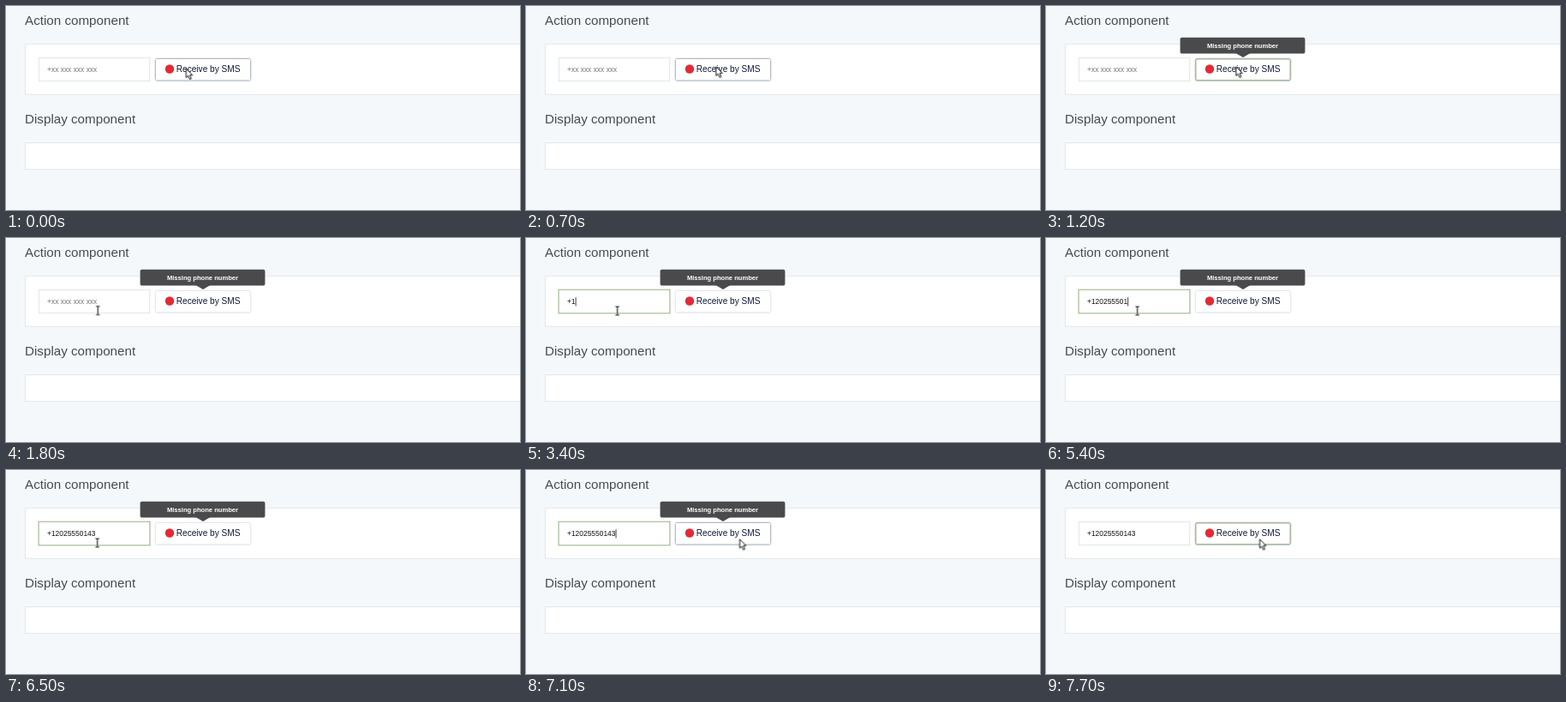
An HTML page for the animation above (8000 ms loop, 600 by 238 pixels).

```html
<!DOCTYPE html>
<html lang="en">
<head>
<meta charset="utf-8">
<title>SMS form</title>
<style>
  html, body { margin: 0; width: 100%; height: 100%; overflow: hidden; background: #f4f8fb; }
  svg { display: block; width: 600px; height: 238px; font-family: "Liberation Sans", Arial, sans-serif; }

  .heading { font-size: 15.2px; fill: #474b50; }
  .field { font-size: 8.44px; }
  .label { font-size: 10.13px; fill: #0c1935; }
  .tip-text { font-size: 7.6px; font-weight: bold; fill: #fff; text-anchor: middle; }
  .panel { fill: #fff; stroke: #e1e5e8; stroke-width: .8; filter: drop-shadow(0 .6px .6px rgba(0,0,0,.08)); }
  .input { fill: #fff; stroke: #dfe1e3; stroke-width: .8; filter: drop-shadow(0 .5px .5px rgba(0,0,0,.08)); }
  .button { fill: #fff; filter: drop-shadow(0 .7px 1px rgba(30,45,70,.34)); }
  .hover { fill: #fff; filter: drop-shadow(0 .9px 1.2px rgba(25,42,75,.7)); }
  .ring { fill: none; stroke: #9fb78b; stroke-width: 1; }

  .anim { animation: 8s step-end infinite; }
  .hover { animation-name: hover; }
  .button-ring { animation-name: button-ring; }
  .input-ring { animation-name: input-ring; }
  .tip { animation-name: tip; }
  .hint { animation-name: hint; }
  .pen { animation-name: type; }
  .caret { animation-name: caret; }
  .pointer { animation-name: move; }
  .arrow { animation-name: arrow; }
  .beam { animation-name: beam; }

  @keyframes hover { 0%, 87.5% { opacity: 1 } 20% { opacity: 0 } 100% { opacity: 1 } }
  @keyframes button-ring { 0%, 22.5% { opacity: 0 } 13.75%, 95%, 100% { opacity: 1 } }
  @keyframes input-ring { 0%, 95%, 100% { opacity: 0 } 23.75% { opacity: 1 } }
  @keyframes tip { 0%, 96.25%, 100% { opacity: 0 } 13.75%, 95% { opacity: .5 } 15% { opacity: 1 } }
  @keyframes hint { 0% { opacity: 1 } 37.5%, 100% { opacity: 0 } }
  @keyframes caret {
    0%, 31.25%, 81.25%, 95%, 100% { opacity: 0 }
    23.75%, 32.5%, 88.75% { opacity: 1 }
  }
  @keyframes arrow { 0%, 87.5%, 100% { opacity: 1 } 21.25% { opacity: 0 } }
  @keyframes beam { 0%, 87.5%, 100% { opacity: 0 } 21.25% { opacity: 1 } }

  /* one "+" is .584em wide, one digit .556em */
  @keyframes type {
    0% { transform: translateX(0) }
    37.5% { transform: translateX(4.93px) }
    42.5% { transform: translateX(9.62px) }
    43.75% { transform: translateX(14.32px) }
    48.75% { transform: translateX(19.01px) }
    50% { transform: translateX(23.7px) }
    53.75% { transform: translateX(28.4px) }
    57.5% { transform: translateX(33.09px) }
    61.25% { transform: translateX(37.78px) }
    63.75% { transform: translateX(42.47px) }
    67.5% { transform: translateX(47.17px) }
    71.25% { transform: translateX(51.86px) }
    73.75%, 100% { transform: translateX(56.55px) }
  }

  @keyframes move {
    0% { transform: translate(210.3px, 73px) }
    1.25% { transform: translate(208px, 73px) }
    2.5% { transform: translate(213px, 72px) }
    3.75% { transform: translate(226px, 70px) }
    5% { transform: translate(236px, 69px) }
    6.25% { transform: translate(239px, 69px) }
    7.5% { transform: translate(230px, 70px) }
    8.75% { transform: translate(221.8px, 70.8px) }
    18.75% { transform: translate(212px, 74px) }
    20% { transform: translate(180px, 76.5px) }
    21.25% { transform: translate(130px, 83px) }
    22.5% { transform: translate(107.3px, 84.6px) }
    26.25% { transform: translate(106.6px, 85px) }
    85% { transform: translate(122px, 82px) }
    86.25% { transform: translate(160px, 75px) }
    87.5% { transform: translate(222px, 74px) }
    88.75%, 100% { transform: translate(249.5px, 80.6px) }
  }
</style>
</head>
<body>
<svg viewBox="0 0 600 238">
  <text class="heading" x="22" y="21.5">Action component</text>
  <text class="heading" x="22" y="136.8">Display component</text>
  <rect class="panel" x="22.5" y="44.5" width="600" height="58.6"/>
  <rect class="panel" x="22.5" y="159.8" width="600" height="30.8"/>

  <rect class="input" x="38.4" y="60.6" width="129.4" height="27"/>
  <text class="field" x="48" y="77.4" fill="#111">+12025550143</text>
  <g class="pen anim">
    <rect x="48" y="68" width="60" height="13" fill="#fff"/>
    <rect class="caret anim" x="48.2" y="69.2" width=".8" height="10.2" fill="#111"/>
  </g>
  <text class="field hint anim" x="48" y="77.4" fill="#777">+xx xxx xxx xxx</text>
  <rect class="ring input-ring anim" x="38" y="60.2" width="130" height="27.7"/>

  <rect class="button" x="175" y="62" width="110" height="24.6" rx="1"/>
  <rect class="hover anim" x="175" y="62" width="110" height="24.6" rx="1"/>
  <rect class="ring button-ring anim" x="175" y="62" width="110" height="24.6" rx=".6"/>
  <circle cx="191" cy="73.5" r="5.2" fill="#e22b35"/>
  <text class="label" x="198.7" y="77.2">Receive by SMS</text>

  <g class="tip anim">
    <path d="M221.5 55h17l-8.5 5z" fill="#4a4a4c"/>
    <rect x="156.6" y="36.8" width="145.8" height="18.8" rx="2" fill="#4a4a4c"/>
    <text class="tip-text" x="229.5" y="48.8">Missing phone number</text>
  </g>

  <g class="pointer anim">
    <path class="arrow anim" d="M0 0V10.6L2.4 8.4 4.2 12.5 6 11.7 4.3 7.7H7.4Z" fill="#fff" stroke="#111" stroke-width="1"/>
    <g class="beam anim" fill="none">
      <path id="bar" d="M-2.3-5H-.8L0-4.4.8-5H2.3M0-4.4V4.4M-2.3 5H-.8L0 4.4.8 5H2.3" stroke="#fff" stroke-width="2.2"/>
      <path d="M-2.3-5H-.8L0-4.4.8-5H2.3M0-4.4V4.4M-2.3 5H-.8L0 4.4.8 5H2.3" stroke="#222" stroke-width="1.2"/>
    </g>
  </g>
</svg>
</body>
</html>
```
